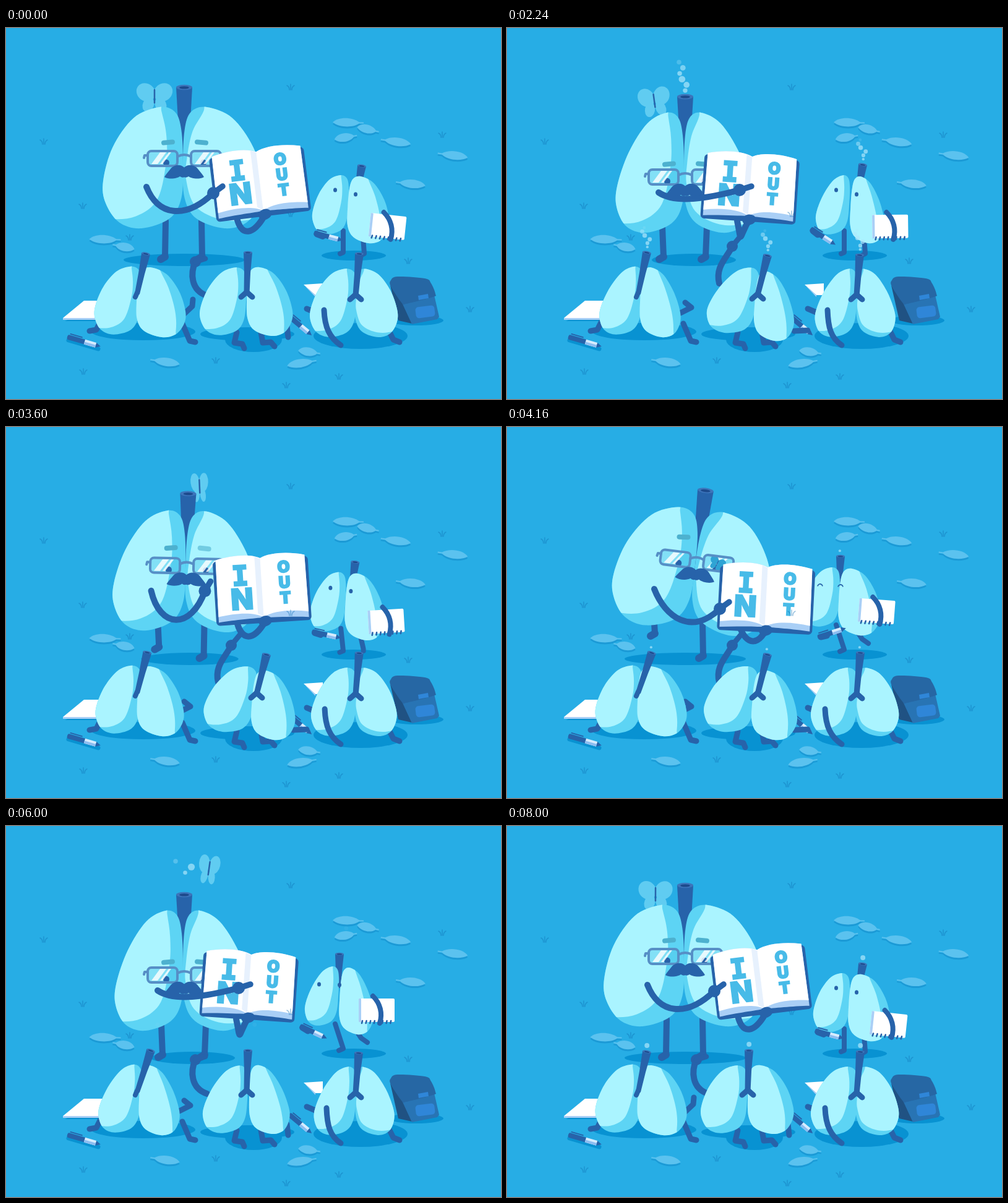
Animation of 800 by 600 pixels, one loop 8.04 s. Source, as an HTML page with a canvas:

```html
<!DOCTYPE html>
<html lang="en">
<head>
<meta charset="utf-8">
<title>Breathing class</title>
<style>
html, body { margin: 0; width: 100%; height: 100%; overflow: hidden; background: #27ade5; }
canvas { display: block; width: 800px; height: 600px; }
</style>
</head>
<body>
<canvas id="stage" width="800" height="600"></canvas>
<script>
const c = document.getElementById('stage').getContext('2d');
const LOOP = 8040, BREATH = LOOP / 2, RAD = Math.PI / 180;
const SKY = '#27ade5', SHADE = '#0892d2', LIGHT = '#aaf4ff', MID = '#5dd4f4',
  DARK = '#2763aa', DEEP = '#1d4a8c', WHITE = '#fff', EDGE = '#a9cff6', INK = '#48bbe8';
let now = 0;

// Timing
const ease = f => f * f * (3 - 2 * f);
const ramp = (a, b, t = now) => ease(Math.min(1, Math.max(0, (t - a) / (b - a))));
const hold = (a, b, d, e) => ramp(a, b) - ramp(d, e);
const lerp = (a, b, f) => a.map((v, i) => v + (b[i] - v) * f);

// Drawing
function at(x, y, deg, draw) {
  c.save();
  c.translate(x, y);
  c.rotate(deg * RAD);
  draw();
  c.restore();
}
function fill(color) { c.fillStyle = color; c.fill(); }
function stroke(color, w) { c.strokeStyle = color; c.lineWidth = w; c.stroke(); }
function oval(x, y, rx, ry, color, rot = 0) {
  c.beginPath();
  c.ellipse(x, y, rx, ry, rot, 0, 7);
  fill(color);
}
function path(p) {
  c.beginPath();
  for (let i = 0; i < p.length; i += 2) c.lineTo(p[i], p[i + 1]);
}
function line(p, w, color = DARK) { path(p); stroke(color, w); }
function poly(p, color) { path(p); fill(color); }
function box(x, y, w, h, r, color) {
  c.beginPath();
  c.roundRect(x, y, w, h, r);
  fill(color);
}
// Limb from p to q; the bends are offsets from either end.
function limb([px, py], [ax, ay], [qx, qy], [bx, by], w) {
  c.beginPath();
  c.moveTo(px, py);
  c.bezierCurveTo(px + ax, py + ay, qx + bx, qy + by, qx, qy);
  stroke(DARK, w);
}
function hand([x, y], [dx, dy], r) {
  oval(x, y, r, r, DARK);
  line([x, y, x + dx, y + dy], r * .95);
}
// Closed smooth curve through points.
function blob(p, color) {
  const n = p.length / 2, X = i => p[(i + n) % n * 2], Y = i => p[(i + n) % n * 2 + 1];
  c.beginPath();
  c.moveTo(p[0], p[1]);
  for (let i = 0; i < n; i++) {
    c.bezierCurveTo(
      X(i) + (X(i + 1) - X(i - 1)) / 6, Y(i) + (Y(i + 1) - Y(i - 1)) / 6,
      X(i + 1) - (X(i + 2) - X(i)) / 6, Y(i + 1) - (Y(i + 2) - Y(i)) / 6,
      X(i + 1), Y(i + 1));
  }
  fill(color);
}

// Unit lung: inner side at x = 1, top at y = 0.
const PEAR = [.7, 0, .9, .04, .98, .19, 1, .47, .98, .75, .83, .92, .48, 1,
  .2, .95, .03, .79, 0, .61, .12, .33, .38, .09];
const LIT = {
  near: [-.3, -.2, .66, -.15, .73, .03, .79, .22, .79, .45, .68, .76, .41, .9, .06, .92, -.3, .85],
  thin: [-.3, -.2, .66, -.15, .74, .03, .88, .2, .95, .42, .96, .6, .84, .82, .5, .93, .1, .92, -.3, .8],
  far: [1.3, -.2, .58, -.15, .53, .02, .34, .29, .21, .62, .2, .9, .3, 1.2, 1.3, 1.2]
};
// An emptier lung narrows at its outer shoulder.
const narrow = (p, slim) => p.map((u, i) => i % 2 ? u : u + slim * .2 * (1 - p[i + 1]) * (1 - u));
function lobe([x, y, w, h], deg, side, lit, slim) {
  at(x + w / 2, y + h / 2, deg, () => {
    c.scale(side * w, h);
    c.translate(-.5, -.5);
    blob(narrow(PEAR, slim), MID);
    c.clip();
    blob(narrow(LIT[lit], slim), LIGHT);
  });
}

function pipe([x, y], [bx, by], w, tip) {
  const deg = Math.atan2(by - y, bx - x) / RAD - 90, len = Math.hypot(bx - x, by - y);
  at(x, y, deg, () => {
    poly([-w, 0, w, 0, w * .72, len * .5, tip, len, -tip, len, -w * .72, len * .5], DARK);
    oval(0, 0, w, w * .32, '#3d75bb');
    oval(0, .4, w * .6, w * .17, DEEP);
  });
}
function fork(top, [x, y]) {
  pipe(top, [x, y], 7, 4.5);
  line([x - 9, y + 6, x, y - 2, x + 9, y + 6], 9);
}

function pen(x, y, deg, len = 46) {
  at(x, y, deg, () => {
    const h = len / 2;
    box(-h, -4, h + 4, 8, 3, DARK);
    line([-h + 4, -6, -4, -6], 2);
    box(2, -4, h - 8, 8, 0, '#d6ecff');
    box(2, 0, h - 8, 4, 0, '#8dbdf0');
    poly([h - 6, -4, h + 2, 0, h - 6, 4], DARK);
  });
}

function leaf(x, y, len, deg, stem) {
  for (const [dy, color] of [[3, '#1b9ad6'], [0, '#5bc2ef']]) at(x, y + dy, deg, () => {
    c.scale(stem * len, 1);
    c.beginPath();
    c.moveTo(-.5, 0);
    c.bezierCurveTo(-.32, -10, .15, -9, .36, -1);
    c.lineTo(.5, -1);
    c.lineTo(.5, 1);
    c.lineTo(.36, 1);
    c.bezierCurveTo(.15, 9, -.3, 8, -.5, 0);
    fill(color);
  });
}

function grass(x, y) {
  for (const d of [-1, 0, 1]) {
    c.beginPath();
    c.moveTo(x + d * 2, y + 5);
    c.quadraticCurveTo(x + d * 2, y, x + d * 6, y - 4 + Math.abs(d) * 2);
    stroke('rgba(16,112,178,.42)', 1.5);
  }
}

function scenery() {
  [[553, 153, 50, 1, 1], [585, 164, 36, 12, 1], [549, 177, 37, -10, 1], [630, 184, 49, 9, -1],
   [722, 206, 49, 8, -1], [654, 252, 48, 7, -1], [160, 342, 51, 1, 1], [190, 354, 36, 12, -1],
   [257, 540, 48, 9, -1], [490, 524, 36, 8, 1], [478, 542, 48, -10, 1]].forEach(l => leaf(...l));

  poly([95, 474, 155, 474, 155, 448], SHADE);
  poly([92, 469, 126, 441, 165, 441, 165, 469], WHITE);
  poly([92, 469, 165, 469, 165, 472, 92, 472], EDGE);
  line([101, 505, 149, 519], 7, SHADE);
  pen(125, 507, 16, 54);

  oval(663, 473, 44, 8, SHADE);
  poly([621, 416, 640, 443, 656, 478, 634, 473], '#205283');
  poly([638, 440, 692, 432, 700, 467, 697, 471, 656, 479], '#2874b4');
  blob([622, 408, 633, 402, 677, 405, 687, 413, 694, 430, 690, 435, 647, 446, 640, 445, 622, 418], '#2667a4');
  poly([666, 433, 682, 430, 683, 437, 667, 440], '#2f86d8');
  at(677, 459, -7, () => box(-15, -9, 31, 18, 5, '#2f86d8'));

  poly([481, 415, 512, 413, 512, 432, 500, 432], WHITE);
  poly([481, 415, 500, 432, 500, 435], EDGE);
}

function wings(open, color) {
  for (const s of [-1, 1]) {
    c.save();
    c.scale(s * open, 1);
    oval(14, -8, 16, 14, color, -.7);
    oval(10, 12, 9, 12, color, -.4);
    c.restore();
  }
  line([0, -12, 0, 9], 2.5);
}

// Rests on the teacher, flies up, hides behind, and comes back.
function butterfly() {
  const stops = [[0, 240, 112], [2500, 238, 120], [3040, 270, 82], [3400, 300, 32], [3900, 332, 195],
    [5200, 332, 230], [5600, 342, 35], [6000, 328, 70], [6700, 300, 36], [7700, 240, 112], [LOOP, 240, 112]];
  const i = stops.findIndex(s => s[0] > now), a = stops[i - 1], b = stops[i];
  const [, x, y] = lerp(a, b, (now - a[0]) / (b[0] - a[0]));
  const turn = now / LOOP * 2 * Math.PI;
  at(x, y, -8 * Math.sin(turn), () => wings(.72 + .28 * Math.cos(turn * 21), '#60ccf1'));
}

function teacherPose() {
  const empty = hold(850, 1350, 3300, 4050) + hold(5350, 5900, 6900, 7700);
  const out = hold(800, 1200, 2400, 2800) + hold(5450, 5850, 6900, 7600);
  const up = hold(2400, 2800, 3400, 3900) + hold(4600, 5050, 5450, 5850);
  const walk = hold(3300, 4000, 4350, 4800);
  const crouch = hold(4500, 5100, 5400, 5850);
  const top = 128 + 9 * empty + 42 * crouch + 5 * walk;
  const faceY = top + 83 + 21 * out + 9 * up + 12 * crouch;
  const pipeY = top - 32 + 6 * empty + 13 * crouch;
  const tilt = 7 * walk - 2.5 * up, x = 288 + 5 * walk;
  const mouth = [x + Math.sin(tilt * RAD) * (330 - pipeY), pipeY];
  return { empty, out, up, walk, crouch, top, faceY, pipeY, tilt, x, mouth };
}

function face({ out, up, walk, crouch, faceY }) {
  at(0, faceY - 330, 0, () => {
    [[-26, 1 - crouch, -5], [28, 1 - crouch - walk, 5]].forEach(([x, alpha, slope]) => {
      c.globalAlpha = Math.max(0, alpha);
      at(x, -26 + 5 * out + 2 * up - 10 * walk, slope, () => box(-11, -4, 22, 8, 4, '#4db1cf'));
    });
    c.globalAlpha = 1;
    for (const s of [-1, 1]) {
      const x = s * 35;
      c.save();
      c.beginPath();
      c.roundRect(x - 24, -12, 48, 24, 6);
      fill('rgba(80,200,235,.45)');
      c.clip();
      if (crouch > .5) {
        c.beginPath();
        c.arc(s * 30 + 3, 11, 7, Math.PI * 1.1, Math.PI * 1.9);
        stroke(DARK, 3);
      } else oval(s * 30 + 1, 7, 5, 5.5, DARK);
      for (const [shift, w] of [[-18, 10], [-4, 4]]) {
        poly([x + shift, 9, x + shift + 14, -10, x + shift + 14 + w, -10, x + shift + w, 9], 'rgba(255,255,255,.8)');
      }
      if (s > 0 && walk > .5) at(x - 2, 0, 20, () => { c.scale(.45, .45); wings(1, '#2fa4d4'); });
      c.restore();
      c.beginPath();
      c.roundRect(x - 24, -12, 48, 24, 6);
      stroke('#568fc6', 4);
    }
    c.beginPath();
    c.moveTo(-11, -3);
    c.quadraticCurveTo(0, -9, 11, -3);
    stroke('#568fc6', 4);
    line([-59, -5, -64, -5, -65, -1], 4, '#568fc6');
    for (const s of [-1, 1]) at(0, 22, 0, () => {
      c.scale(s, 1);
      c.beginPath();
      c.moveTo(-.5, -7);
      c.bezierCurveTo(6, -14, 18, -12, 23, -4);
      c.bezierCurveTo(27, 1, 30, 4, 32, 8);
      c.bezierCurveTo(25, 12, 12, 11, 7, 7);
      c.quadraticCurveTo(3, 10, -.5, 8);
      fill(DARK);
    });
  });
}

function letter(ch, x, y, size, font, extra) {
  c.font = `900 ${size}px ${font}`;
  c.textAlign = 'center';
  c.fillStyle = c.strokeStyle = INK;
  c.fillText(ch, x, y + size * .364);
  c.lineJoin = 'miter';
  c.lineWidth = extra;
  c.strokeText(ch, x, y + size * .364);
  c.lineJoin = 'round';
}

function pages(bottom, dip, color) {
  c.beginPath();
  c.moveTo(-72, -49);
  c.bezierCurveTo(-45, -56, -15, -56, 0, -48);
  c.bezierCurveTo(15, -56, 45, -56, 72, -49);
  c.lineTo(73, bottom);
  c.bezierCurveTo(45, bottom - dip, 15, bottom - dip, 0, 48);
  c.bezierCurveTo(-15, bottom - dip, -45, bottom - dip, -73, bottom);
  fill(color);
}

function book() {
  box(-77, -47, 154, 104, 6, DARK);
  pages(52, 3, EDGE);
  pages(43, 5, WHITE);
  poly([0, -47, -9, -51, -9, 41, 0, 47], '#e7f1fd');
  letter('I', -34, -22, 44, '"DejaVu Sans Mono", monospace', 3);
  letter('N', -33, 16, 48, 'Inter, sans-serif', 1.5);
  [...'OUT'].forEach((ch, i) => letter(ch, 37, -32 + i * 25, 26, 'Inter, sans-serif', 2));
}

function teacher(p) {
  const { empty, out, up, walk, crouch, top, x, tilt } = p;
  for (const s of [-1, 1]) {
    const lift = s < 0 ? walk : 0, ax = 287 + s * (30 + 4 * empty) - 18 * lift, ay = 370 - 36 * lift;
    line([287 + s * (29 + 7 * empty) - 20 * lift, top + 184, ax, ay, ax - 7, ay + 4], 10);
    line([ax, ay, ax - 7, ay + 4], 12);
  }
  at(x, 330, tilt, () => {
    pipe([0, p.pipeY - 330], [0, top - 232], 13, 2);
    const w = 129 - 12 * empty + 4 * crouch, h = 196 - 2 * empty;
    lobe([-2 - w, top - 330, w, h], 0, 1, 'near', empty);
    lobe([-2, top - 330, w, h], 0, -1, 'thin', empty);
    face(p);
  });

  const bx = 410 - 17 * out + 9 * walk - 7 * crouch, by = 248 + 8 * out + 2 * up + 27 * walk + 39 * crouch;
  const deg = -7 + 11 * out - up + 10 * walk + 6 * crouch;
  limb([372, top + 175], [8, 38], [bx + 2 - 54 * Math.sin(deg * RAD), by + 54], [-18, 32], 10);
  at(bx, by, deg, () => {
    book();
    oval(2, 54, 11, 8.5, DARK, -.2);
  });

  // Blend of pointing left, pointing right and a raised finger.
  const blend = (a, b, d) => a.map((v, i) => v + out * (b[i] - v) + up * (d[i] - v));
  const palm = blend([bx - 75, by + 19], [bx - 17, by + 6], [288 + 24, p.faceY + 33]);
  limb([227 + 18 * out + 5 * up + 11 * walk, top + 129], blend([18, 46], [27, 18], [12, 70]),
    palm, blend([-46, 44], [-53, 14], [-10, 74]), 10);
  hand(palm, blend([15, -11], [19, -6], [6, -18]), 10);
}

// Pupils share one breath: a slow sigh, a pause, a quick fill.
function pupilPose() {
  const beat = now % BREATH;
  const empty = ramp(140, 1900, beat) - ramp(3050, 3900, beat);
  const away = hold(3350, 4050, 6100, 7000);
  const lean = hold(400, 1200, 5200, 5950);
  const notebook = 6 - 6 * ramp(0, 400, beat) - 13 * ramp(2100, 3050, beat) + 19 * ramp(3250, 3950, beat);
  return { empty, away, lean, notebook, slim: .4 + .7 * empty, mouths: [
    [226 + 8 * away, 365 - 2 * empty],
    [391 + 30 * lean, 363 + 5 * lean],
    [571 - empty, 365 + 2 * empty],
    [575 - 36 * away, 223 - 14 * away - 2 * empty]] };
}

function standing({ empty, away, notebook, slim, mouths }) {
  line(lerp([545, 328, 545, 363, 540, 365], [532, 320, 545, 360, 538, 363], away), 8);
  line(lerp([577, 338, 579, 365, 575, 367], [559, 320, 574, 343, 584, 350], away), 8);
  const [px, py] = mouths[3];
  pipe([px, py], [566 - 29 * away, 275 - 13 * away], 7, 4);
  const dx = -16 * away, dy = -11 * away;
  lobe([495 + dx + 2 * empty, 237 + dy, 58 - 2 * empty, 97], 4, 1, 'near', slim);
  lobe([552 + dx + 3 * empty, 241 + dy, 70 - 10 * empty, 107], 3, -1, 'far', slim);
  for (const [x, y] of [[532 - 26 * away, 262 - 6 * away], [565 - 26 * away, 269 - 12 * away]]) {
    if (now > 3700 && now < 5700) {
      c.beginPath();
      c.arc(x, y + 2, 4, Math.PI * 1.1, Math.PI * 1.9);
      stroke(DARK, 1.8);
    } else oval(x, y, 3, 3.6, DARK);
  }
  const penX = 520 - 10 * empty + away * (4 - 18 * empty), penDeg = 15 + 18 * empty - away * (33 - 25 * empty);
  pen(penX, 337 - 4 * away, penDeg);
  at(penX, 337 - 4 * away, penDeg, () => line([-18, 1, -8, 2], 10));

  const nx = 619 - .4 * notebook - 20 * away, ny = 322 - 23 * away;
  at(nx, ny, notebook, () => {
    box(-29, -20, 58, 38, 2, WHITE);
    box(-29, -20, 4, 38, 1, EDGE);
    for (let i = 0; i < 8; i++) line([-23 + i * 6.6, 16, -24 + i * 6.6, 20], 2.6);
  });
  limb([nx - 6, ny - 24], [12, 12], [nx + 5, ny + 20], [5, -16], 8);
}

function leftPupil({ empty, slim, mouths }) {
  line([152, 476, 146, 488, 135, 490], 9);
  line([285, 478, 297, 506, 306, 508], 9);
  line(lerp([284, 466, 301, 450, 302, 439], [280, 461, 298, 452, 288, 444], hold(300, 1000, 6400, 7500)), 9);
  lobe([143 + 4 * empty, 384, 74 - 3 * empty, 112], 5, 1, 'near', slim);
  lobe([211 + 4 * empty, 388, 82 - 11 * empty, 112], 2, -1, 'far', slim);
  pipe(mouths[0], [212, 430], 7, 4);
  line([212, 428, 209, 435], 8);
}

function midPupil({ empty, lean, slim, mouths }) {
  const palm = [306 + 58 * lean, 378 - 25 * lean];
  limb([325 + 18 * lean, 433 - 20 * lean], [-27 + 20 * lean, -9 - 18 * lean], palm, [-8, 18], 10);
  hand(palm, [16 - 2 * lean, -5 - 12 * lean], 9);
  pen(475, 481, 40);
  line([373, 492, 369, 509, 382, 511, 385, 518], 9);
  line([412, 492, 415, 509, 428, 508, 434, 515], 9);
  line(lerp([454, 482, 456, 500], [464, 490, 486, 489], lean), 9);
  lobe([313 + 2 * empty + 7 * lean, 386 - 3 * lean, 75 + 6 * lean, 111], 4 + 6 * lean, 1, 'near', slim);
  lobe([389 + 4 * empty + 7 * lean, 387 + 8 * lean, 76 - 6 * empty, 111], 4 * lean, -1, 'far', slim);
  fork(mouths[1], [389 + 16 * lean, 429 + 3 * lean]);
}

function rightPupil({ empty, slim, mouths }) {
  line([486, 454, 500, 460], 9);
  line([616, 484, 626, 504, 636, 508], 9);
  lobe([491 + 4 * empty, 388, 75 - 5 * empty, 112], 4, 1, 'near', slim);
  lobe([563 + empty, 389, 71 - 4 * empty, 111], -2, -1, 'thin', slim);
  limb([514 + 4 * empty, 456], [1, 28], [541, 513], [-18, -12], 9);
  fork(mouths[2], [565, 433]);
}

// Breath bubbles rise, drift and fade above a pipe.
function bubbles([x, y], size, spans) {
  for (const [from, to] of spans) for (let i = 0; from + i * 150 < to; i++) {
    const age = (now - from - i * 150) / 900;
    if (age < 0 || age > 1) continue;
    const noise = Math.sin(i * 12.99 + from) * 43.7, seed = noise - Math.floor(noise);
    c.globalAlpha = .7 * Math.min(1, (1 - age) * 3);
    oval(x + (seed * 2 - 1) * 18 * age * size, y - (8 + 55 * age) * size,
      (3 + 3 * (seed * 7 % 1)) * size, (3 + 3 * (seed * 7 % 1)) * size, '#aee6fb');
  }
  c.globalAlpha = 1;
}

function draw() {
  c.fillStyle = SKY;
  c.fillRect(0, 0, 800, 600);
  c.lineCap = c.lineJoin = 'round';
  const big = teacherPose(), small = pupilPose();
  oval(288 + 14 * big.empty, 375, 98 - 30 * big.empty, 10, SHADE);
  oval(562, 368, 52, 8, SHADE);
  oval(222, 491, 84, 14, SHADE);
  oval(390, 495, 76, 11, SHADE);
  oval(400, 504, 46, 20, SHADE);
  oval(573, 498, 76, 21, SHADE);
  scenery();
  butterfly();
  standing(small);
  teacher(big);
  leftPupil(small);
  midPupil(small);
  rightPupil(small);
  small.mouths.forEach(m => bubbles(m, .68, [[60, 2300], [4080, 5250], [7890, LOOP]]));
  bubbles(big.mouth, 1, [[860, 2300], [5250, 5560]]);
  [[61, 183], [124, 287], [200, 338], [460, 95], [705, 172], [650, 376], [750, 454],
   [538, 563], [453, 577], [339, 537], [125, 555], [460, 300]].forEach(g => grass(...g));
}

const start = performance.now();
function tick() {
  now = (performance.now() - start) % LOOP;
  draw();
  requestAnimationFrame(tick);
}
tick();
</script>
</body>
</html>
```
